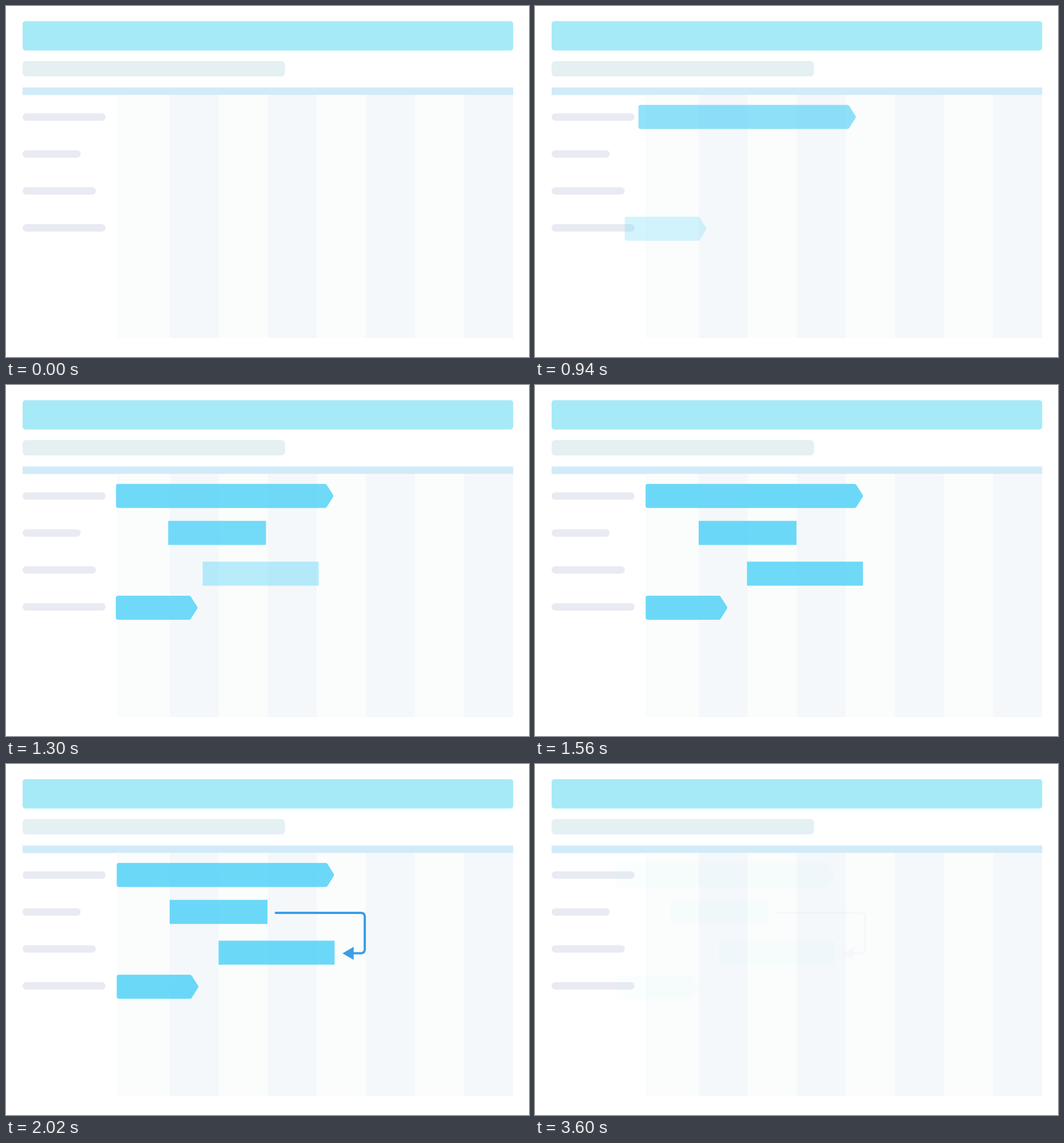
An HTML page for the animation above (4.86 s loop, 914 by 613 pixels).

```html
<!DOCTYPE html>
<html lang="en">
<head>
<meta charset="utf-8">
<title>Timeline chart</title>
<style>
  html, body { margin: 0; width: 100%; height: 100%; overflow: hidden; background: #fff; }
  svg { display: block; width: 914px; height: 613px; }
</style>
</head>
<body>
<svg id="stage" viewBox="0 0 914 613"></svg>
<script>
const LOOP = 4860, STEP = 20, SHIFT = 52;
const LEAVE = 3518, LEAVE_END = 3600, REST = 0.035;
const stage = document.getElementById('stage');

function add(tag, attrs, parent = stage) {
  const el = document.createElementNS('http://www.w3.org/2000/svg', tag);
  for (const key in attrs) el.setAttribute(key, attrs[key]);
  parent.appendChild(el);
  return el;
}

const rect = (x, y, width, height, fill, rx = 0, parent = stage) =>
  add('rect', { x, y, width, height, fill, rx }, parent);

// Header, subtitle and chart grid
rect(29, 26.4, 857.4, 51.4, '#a7eaf7', 5);
rect(29, 96.2, 458.5, 26.7, '#e4f0f2', 6);
rect(29, 142.3, 857.4, 13.2, '#d1ebf8');
rect(194, 155.5, 6.25, 424.5, '#f9fcfc');
for (let i = 0; i < 8; i++) {
  rect(200.25 + i * 85.75, 155.5, 85.75, 424.5, i % 2 ? '#f4f8fb' : '#fbfdfc');
}
[145, 101.5, 128, 145].forEach((w, i) => rect(29, 187.4 + i * 64.5, w, 13, '#e8ebf1', 6.5));

// Bar with rounded corners on the left and a pointed right end
function pointedPath(x, y, tip) {
  const b = y + 42, m = y + 21, s = tip - 13;
  return `M${x + 4} ${y}H${s - 2}Q${s} ${y} ${s + 1.2} ${y + 1.8}` +
    `L${tip - 0.8} ${m - 1.8}Q${tip + 0.3} ${m} ${tip - 0.8} ${m + 1.8}` +
    `L${s + 1.2} ${b - 1.8}Q${s} ${b} ${s - 2} ${b}` +
    `H${x + 4}Q${x} ${b} ${x} ${b - 4}V${y + 4}Q${x} ${y} ${x + 4} ${y}Z`;
}

const BAR = 'rgba(93,212,248,.9)', LINE = '#3c9ee5';
const parts = [];

// Each part eases in from the left, starting at `start` with decay `rate` per ms
function part(start, rate) {
  const el = add('g', { opacity: 0 });
  parts.push({ el, start, rate });
  return el;
}

add('path', { d: pointedPath(193.5, 172.8, 573.7), fill: BAR }, part(720, 0.0064));
add('path', { d: pointedPath(193.5, 368, 336.5), fill: BAR }, part(900, 0.0087));
rect(286, 237.3, 171, 42, BAR, 0, part(1066, 0.0128));
rect(371.5, 308.5, 202.7, 42, BAR, 0, part(1250, 0.0126));

const link = part(1570, 0.018);
add('path', {
  d: 'M471.5 260H620Q627 260 627 267V323.5Q627 330.5 620 330.5H606',
  fill: 'none', stroke: LINE, 'stroke-width': 4, 'stroke-linecap': 'round'
}, link);
add('path', { d: 'M588 330.7L607.6 319.3V342Z', fill: LINE }, link);

function progress(t, { start, rate }) {
  if (t >= LEAVE_END) return REST;
  if (t > LEAVE) return 1 - (1 - REST) * (t - LEAVE) / (LEAVE_END - LEAVE);
  if (t <= start) return 0;
  const left = Math.exp(-rate * (t - start));
  return left < 0.003 ? 1 : 1 - left;
}

const origin = performance.now();

function draw() {
  const elapsed = (performance.now() - origin) % LOOP;
  const t = Math.floor(elapsed / STEP) * STEP;
  for (const p of parts) {
    const k = progress(t, p);
    p.el.setAttribute('opacity', k);
    p.el.setAttribute('transform', `translate(${(k - 1) * SHIFT} 0)`);
  }
  requestAnimationFrame(draw);
}
draw();
</script>
</body>
</html>
```
